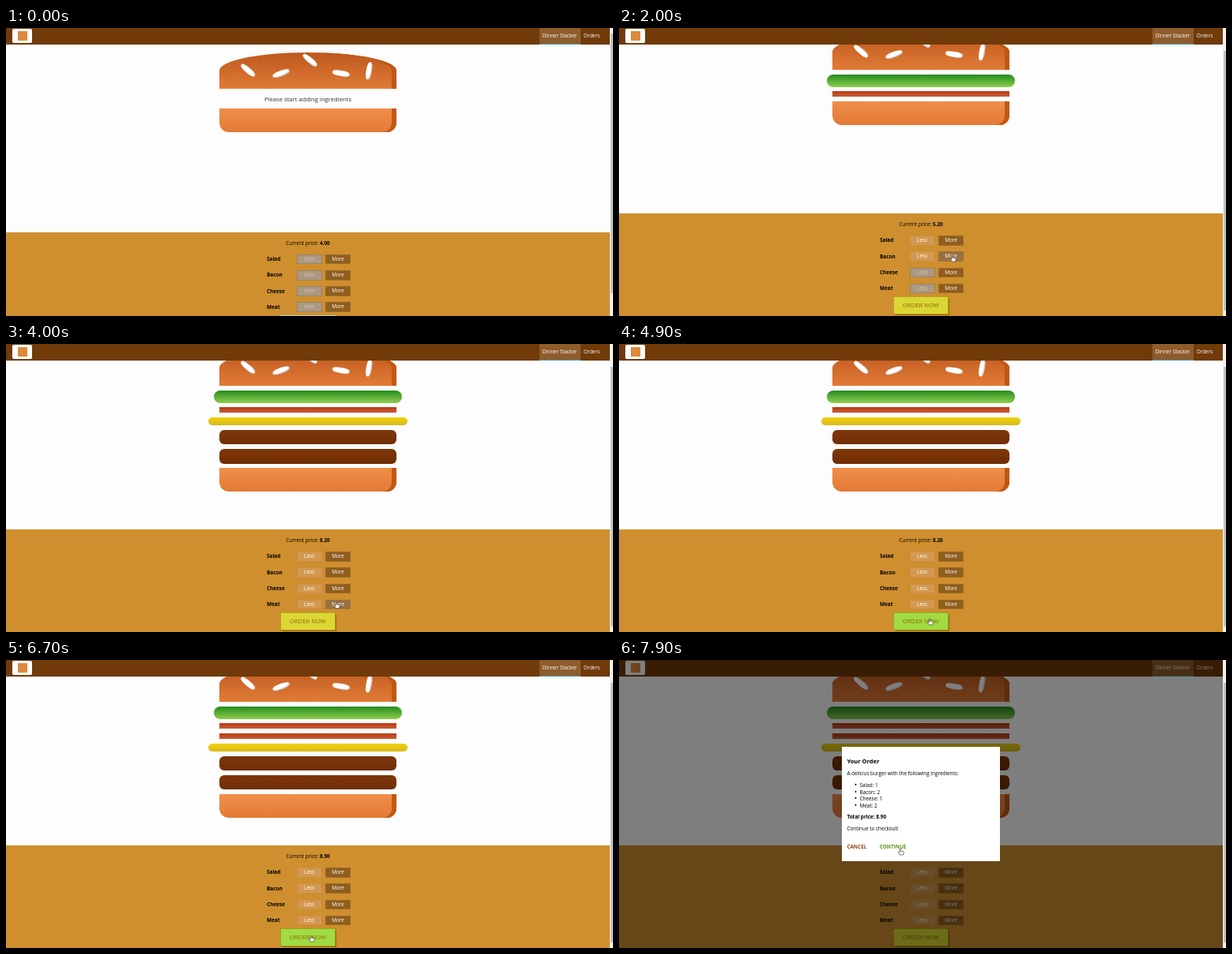
Recreate the animation shown at these times as an HTML page. Size 768x365 px, loop 8 s.

```html
<!DOCTYPE html>
<html lang="en">
<head>
<meta charset="utf-8">
<title>Sandwich order</title>
<style>
html, body { margin: 0; width: 100%; height: 100%; overflow: hidden; background: #fdfdfd; }
body { position: relative; font: 6.4px/10px "Open Sans", sans-serif; color: #000; }
div, .t { position: absolute; box-sizing: border-box; }
.t { white-space: nowrap; transform: translateY(-50%); }
.mid { transform: translate(-50%, -50%); }
b, .bold { font-weight: 700; }

#page { left: 0; top: 0; width: 764px; height: 400px; }
#burger { left: 242px; top: 30.6px; width: 280px; height: 231px; }
#burger > div { left: 50%; transform: translateX(-50%); width: 80%; }
.top { height: 20%; background: linear-gradient(#bc581e, #e27b36); border-radius: 50% 50% 0 0; box-shadow: inset -6px 0 #c15711; }
.bottom { height: 13%; background: linear-gradient(#f08e4a, #e27b36); border-radius: 0 0 12px 12px; box-shadow: inset -6px 0 #c15711; }
#burger .salad { width: 85%; height: 7%; background: linear-gradient(#228c1d, #91ce50); border-radius: 8px; }
.bacon { height: 3%; background: linear-gradient(#bf3813, #c45e38); }
#burger .cheese { width: 90%; height: 4.5%; background: linear-gradient(#f4d004, #d6bb22); border-radius: 8px; }
.meat { height: 8%; background: linear-gradient(#7f3608, #702e05); border-radius: 6px; }
.seed, .seed::before, .seed::after { position: absolute; background: #fff; border-radius: 40%; box-shadow: inset -.8px -1.2px #c9c9c9; }
.seed { width: 10%; height: 15%; top: 50%; }
.seed::before, .seed::after { content: ""; width: 100%; height: 100%; }
.s1 { left: 30%; transform: rotate(-20deg); }
.s1::before { left: 180%; top: -50%; transform: rotate(60deg); }
.s1::after { left: -170%; top: -260%; transform: rotate(60deg); box-shadow: inset -.4px .8px #c9c9c9; }
.s2 { left: 64%; transform: rotate(10deg); box-shadow: inset -1.2px 0 #c9c9c9; }
.s2::before { left: 150%; top: -130%; transform: rotate(90deg); box-shadow: inset .4px 1.2px #c9c9c9; }
.s2::after { display: none; }
#hint { left: 382px; top: 90px; font-size: 7.68px; color: #333; }

#controls { left: 0; top: 258.7px; width: 764px; height: 160px; background: #cf8f2e; box-shadow: 0 -.5px 1px #bbb; }
.btn { width: 32px; height: 12.6px; line-height: 12.6px; text-align: center; color: #fff; }
.less { left: 367.6px; background: #d39952; box-shadow: inset 0 0 0 .5px #c08640; }
.less.off { background: #ac9980; color: #ccc; box-shadow: inset 0 0 0 .6px #7e7365; }
.more { left: 404px; background: #8f5e1e; box-shadow: inset 0 0 0 .5px #aa7730; }
.more.hot { background: #99703f; }
#order { left: 346.6px; top: 364px; width: 70.6px; height: 23px; line-height: 23px; text-align: center; font-size: 7.68px;
  background: #dad735; color: #966909; box-shadow: inset 0 0 0 .5px #966909, .8px .8px .8px #966909; }
#order.hot { background: #a0db41; }
#order.off { background: #c7c6c6; color: #888; box-shadow: inset 0 0 0 .5px #ccc; }

#bar { left: 0; top: 0; width: 764px; height: 20.8px; background: #703b09; color: #fff; }
#logo { left: 8px; top: 1.2px; width: 25px; height: 17.8px; border-radius: 2px; background: #fff; }
#logo div { left: 6.5px; top: 3px; width: 12px; height: 12px; background: #dc8a3c; }
#tab { left: 674.5px; top: 0; width: 52.5px; height: 20.8px; background: #8f5c2c; border-bottom: 1.6px solid #40a4c8; }
#shade { left: 0; top: 0; width: 764px; height: 365px; background: rgba(0, 0, 0, .5); }
#modal { left: 282px; top: 109.5px; width: 200px; height: 145px; background: #fff; box-shadow: .4px .4px 1px #000; }
#track { left: 764px; top: 0; width: 4px; height: 365px; background: #f1f1f1; }
#thumb { left: .5px; width: 3px; height: 329px; background: #c1c1c1; }
#cursor { position: absolute; left: 0; top: 0; overflow: visible; }
#cursor path { fill: #fff; stroke: #222; stroke-width: .6; stroke-linejoin: round; }
</style>
</head>
<body>
<div id="page">
  <div id="burger"></div>
  <span class="t mid" id="hint">Please start adding ingredients</span>
  <div id="controls"></div>
  <span class="t mid" style="left:382px;top:272.7px">Current price: <b id="price"></b></span>
  <div id="order">ORDER NOW</div>
</div>
<div id="bar">
  <div id="logo"><div></div></div>
  <div id="tab"></div>
  <span class="t mid" style="left:700.6px;top:9.6px">Dinner Stacker</span>
  <span class="t mid" style="left:741px;top:9.6px">Orders</span>
</div>
<div id="shade"></div>
<div id="modal"></div>
<div id="track"><div id="thumb"></div></div>
<svg id="cursor" width="8" height="10">
  <path id="arrow" d="M0 0V6.2L1.5 4.9L2.5 7.1L3.5 6.7L2.5 4.5H4.5Z"/>
  <path id="hand" d="M-.7.5Q0-.5.7.5V3L3.8 3.7Q4.5 4 4.3 5L3.6 8H-.6L-2.4 5.2Q-2.5 4-1.5 4.3L-.7 5Z"/>
</svg>
<script>
const $ = id => document.getElementById(id);
const kinds = ['Salad', 'Bacon', 'Cheese', 'Meat'];
const cost = [.5, .7, .4, 1.3];
const heights = [.07, .03, .045, .08];
const H = 231, GAP = 5.6, SCROLL = 23.7, LOOP = 8000, OPEN = 6800;

// [time, ingredient index]
const clicks = [[1200, 0], [1900, 1], [2900, 2], [3500, 3], [3900, 3], [5900, 1]];
// [time, x, y] of the pointer tip
const path = [[300, 452, 246], [450, 440, 254], [700, 438, 256], [1000, 421, 269], [1400, 421, 269],
  [1700, 422, 288], [2300, 422, 288], [2700, 419, 308], [2950, 419, 308], [3100, 416, 324],
  [4050, 418, 327], [4500, 393, 348], [5000, 393, 348], [5500, 430, 308], [5700, 422, 289],
  [6000, 422, 289], [6500, 386, 349], [6850, 386, 349], [7100, 378, 303], [7300, 378, 303],
  [7700, 358, 233], [7900, 356, 239]];

const clamp = v => Math.max(0, Math.min(1, v));
const easeInOut = p => p * p * (3 - 2 * p);

function add(parent, cls, text = '', left, top, tag = 'div') {
  const el = document.createElement(tag);
  el.className = cls;
  el.textContent = text;
  if (left !== undefined) el.style.left = left + 'px';
  if (top !== undefined) el.style.top = top + 'px';
  parent.append(el);
  return el;
}

const burger = $('burger');
const bun = add(burger, 'top');
add(bun, 'seed s1');
add(bun, 'seed s2');
const layers = [0, 1, 1, 2, 3, 3].map(k => ({ k, el: add(burger, kinds[k].toLowerCase()) }));
const base = add(burger, 'bottom');

const rows = kinds.map((name, i) => {
  const y = 293.1 + 20.2 * i;
  add($('page'), 't bold', name, 330, y, 'span');
  return {
    y: y - SCROLL,
    less: add($('page'), 'btn less', 'Less', undefined, y - 6.3),
    more: add($('page'), 'btn more', 'More', undefined, y - 6.3)
  };
});

const line = (text, x, y, cls = '') => add($('modal'), 't ' + cls, text, x, y, 'span');
line('Your Order', 6.4, 18.5, 'bold').style.fontSize = '7.5px';
line('A delicius burger with the following ingredients:', 6.4, 34.5);
[1, 2, 1, 2].forEach((n, i) => {
  line('•', 16.2, 49.4 + 8.6 * i, 'bold');
  line(`${kinds[i]}: ${n}`, 22.5, 49.4 + 8.6 * i);
});
line('Total price: 8.90', 6.4, 89.8, 'bold');
line('Continue to checkout!', 6.4, 104.6);
line('CANCEL', 6.4, 127.2, 'bold').style.color = '#944317';
line('CONTINUE', 47.8, 127.2, 'bold').style.color = '#5c9210';

function pointer(t) {
  let i = path.findIndex(k => k[0] > t);
  if (i < 0) return path[path.length - 1].slice(1);
  if (i === 0) return path[0].slice(1);
  const [a, b] = [path[i - 1], path[i]];
  const p = easeInOut((t - a[0]) / (b[0] - a[0]));
  return [a[1] + (b[1] - a[1]) * p, a[2] + (b[2] - a[2]) * p];
}

function draw(t) {
  const scroll = SCROLL * easeInOut(clamp((t - 100) / 300));
  $('page').style.top = -scroll + 'px';
  $('thumb').style.top = 7 + scroll * .92 + 'px';

  const count = [0, 0, 0, 0];
  for (const [at, k] of clicks) if (t >= at) count[k]++;
  const empty = !count.some(Boolean);
  $('price').textContent = count.reduce((sum, n, i) => sum + n * cost[i], 4).toFixed(2);
  $('hint').style.display = empty ? '' : 'none';

  const left = [...count];
  let y = H * .2 + GAP;
  for (const { k, el } of layers) {
    const shown = left[k]-- > 0;
    el.style.display = shown ? '' : 'none';
    el.style.top = y + 'px';
    if (shown) y += H * heights[k] + GAP;
  }
  base.style.top = (empty ? H * .2 + 25.6 : y) + 'px';

  const open = t >= OPEN;
  const [x, cy] = pointer(t);
  let hand = open && x > 330 && x < 365 && cy > 230 && cy < 244;
  rows.forEach((r, i) => {
    const hot = !open && x > 404 && x < 436 && Math.abs(cy - r.y) < 6.5;
    hand = hand || hot;
    r.more.classList.toggle('hot', hot);
    r.less.classList.toggle('off', !count[i]);
  });
  const overOrder = !open && !empty && x > 346 && x < 418 && cy > 340 && cy < 363;
  $('order').className = empty ? 'off' : overOrder ? 'hot' : '';
  hand = hand || overOrder;

  $('shade').style.display = $('modal').style.display = open ? '' : 'none';
  const p = clamp((t - OPEN) / 300), out = 1 - (1 - p) ** 2;
  $('modal').style.transform = `translateY(${-365 * (1 - out)}px)`;
  $('modal').style.opacity = out;

  $('cursor').style.display = t < 300 ? 'none' : '';
  $('cursor').style.transform = `translate(${x}px, ${cy}px)`;
  $('hand').style.display = hand ? '' : 'none';
  $('arrow').style.display = hand ? 'none' : '';
}

const start = performance.now();
function tick() {
  draw((performance.now() - start) % LOOP);
  requestAnimationFrame(tick);
}
tick();
</script>
</body>
</html>
```
